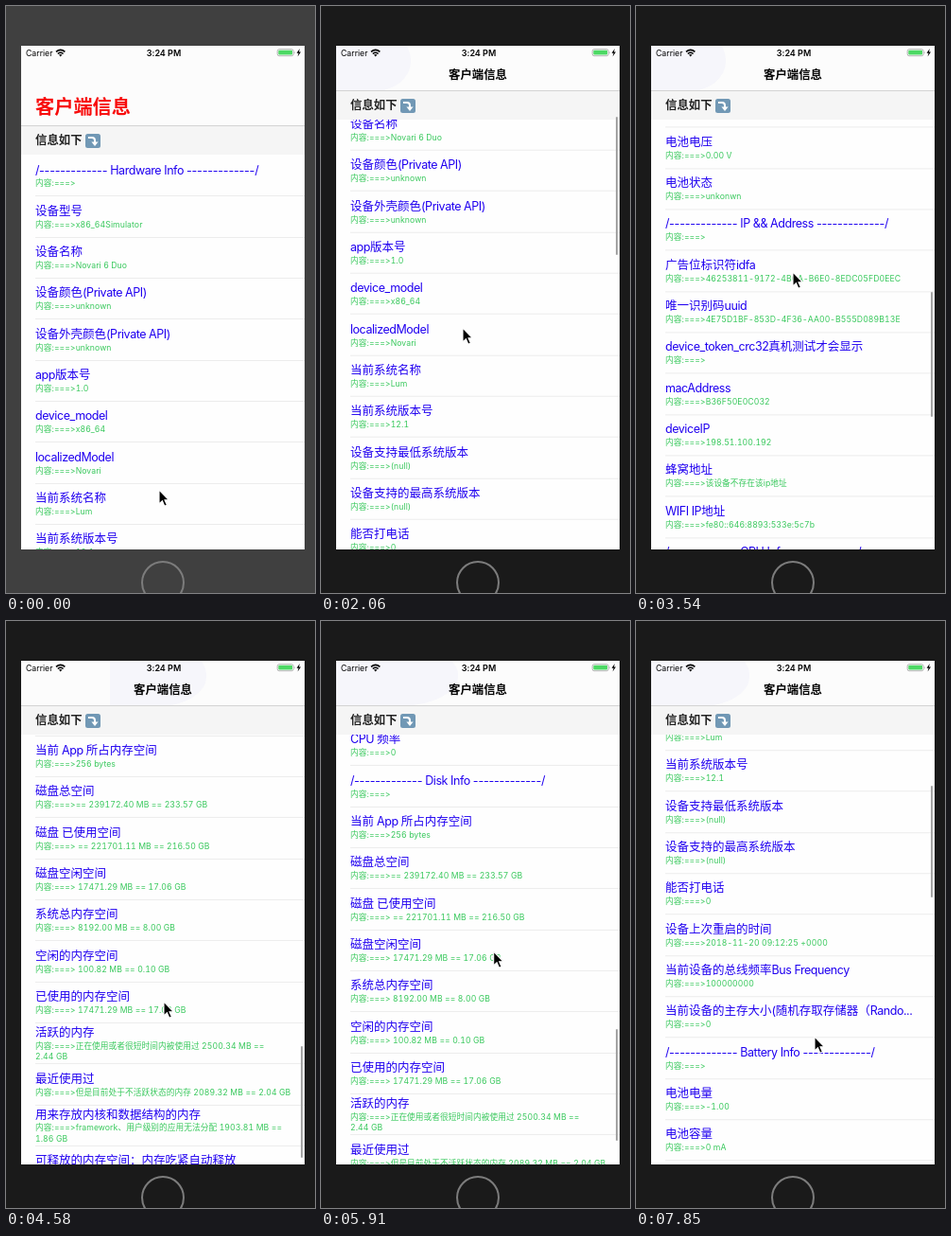
An HTML page that plays this animation: 327x620 px, repeating every 8 s.

```html
<!DOCTYPE html>
<html lang="zh-CN">
<head>
<meta charset="utf-8">
<style>
html, body { margin: 0; width: 100%; height: 100%; overflow: hidden; }
body { position: relative; background: #404040; font-family: Inter, "Noto Sans CJK SC", "Noto Sans CJK", sans-serif; font-variant-ligatures: none; font-feature-settings: "calt" 0; }
div, svg { position: absolute; white-space: nowrap; }
i { font-style: normal; letter-spacing: -.45px; }
b { font-weight: inherit; letter-spacing: -.2px; }
#home { left: 143px; top: 586px; width: 42px; height: 42px; border: 2px solid #7c7c7c; border-radius: 50%; }
#screen { left: 16px; top: 42px; width: 300px; height: 532px; background: #fefefe; overflow: hidden; }
#list { left: 0; top: 0; width: 100%; }
.row { left: 15px; right: 0; height: 42.33px; border-bottom: 1px solid #ececec; }
.name { top: 8.5px; font-size: 12.5px; line-height: 14px; color: #2000f0; }
.value { top: 24.2px; font-size: 8.67px; line-height: 11.5px; letter-spacing: .08px; font-variant-numeric: tabular-nums; color: #38c85c; }
.tall .name { top: 2.9px; }
.tall .value { top: 18.6px; }
#nav { left: 0; top: 0; width: 100%; background: #fcfcfc; overflow: hidden; }
#tint { top: -14px; height: 62px; border-radius: 0 45% 50% 0; background: #f6f6fb; }
#bigClip { left: 0; top: 46px; width: 100%; bottom: 0; overflow: hidden; }
#big { left: 15px; bottom: 5px; font-size: 20.2px; line-height: 28px; font-weight: 600; color: #f80c0c; }
#small { left: 0; top: 22.7px; width: 100%; text-align: center; font-size: 12.4px; line-height: 16px; font-weight: 600; color: #000; }
#head { left: 0; width: 100%; height: 31px; background: #f5f5f5; border-top: 1px solid #d3d3d3; box-sizing: border-box; }
#head div { left: 15px; top: 7.3px; font-size: 12.4px; line-height: 16px; font-weight: 600; color: #222; }
#head svg { left: 68px; top: 8px; }
#thumb { left: 296px; width: 2px; border-radius: 1px; background: #a4a4a4; }
#status { left: 1px; top: 0; }
#pointer { left: 0; top: 0; overflow: visible; }
</style>
</head>
<body>
<div id="home"></div>
<div id="screen">
  <div id="list"></div>
  <div id="nav">
    <div id="tint"></div>
    <div id="bigClip"><div id="big">客户端信息</div></div>
    <div id="small">客户端信息</div>
  </div>
  <div id="head">
    <div>信息如下</div>
    <svg width="16" height="15">
      <rect width="16" height="15" rx="2.5" fill="#7198b5"/>
      <path d="M3 4H7Q10 4 10 7V10" fill="none" stroke="#fff" stroke-width="2"/>
      <path d="M6.4 8.5H13.6L10 13Z" fill="#fff"/>
    </svg>
  </div>
  <div id="thumb"></div>
  <svg id="status" width="298" height="16" font-size="8.7">
    <text x="4" y="10.5">Carrier</text>
    <path d="M36 6.4Q40.7 2.2 45.4 6.4M37.8 8.5Q40.7 6 43.6 8.5" fill="none" stroke="#000" stroke-width="1.6"/>
    <path d="M39 9.6Q40.7 8.3 42.4 9.6L40.7 11.4Z"/>
    <text x="150" y="10.5" text-anchor="middle" font-size="9" font-weight="600">3:24 PM</text>
    <rect x="270.2" y="3.7" width="17" height="7" rx="2" fill="#fff" stroke="#a0a0a0" stroke-width=".8"/>
    <rect x="271.3" y="4.8" width="14.8" height="4.8" rx="1" fill="#4cd964"/>
    <path d="M288.4 6V8.6Q289.6 7.3 288.4 6Z" fill="#a0a0a0"/>
    <path d="M293.8 3L290.6 7.8H292.6L291.6 11.4L295 6.5H293Z"/>
  </svg>
</div>
<svg id="pointer" width="12" height="19">
  <path d="M0 0V14.8L3.4 11.7L5.8 17.2L8.3 16.1L6 10.8H10.4Z" fill="#000" stroke="#fff" stroke-width="1.1"/>
</svg>
<script>
const $ = id => document.getElementById(id);
const ROW = 43.333, TOP = 79, END = 1539, LOOP = 8000;

// One row per line: name|value; "#" marks a section title, "^" a line break.
const rows = `#Hardware Info
设备型号|x86_64Simulator
设备名称|Novari 6 Duo
设备颜色(Private API)|unknown
设备外壳颜色(Private API)|unknown
app版本号|1.0
device_model|x86_64
localizedModel|Novari
当前系统名称|Lum
当前系统版本号|12.1
设备支持最低系统版本|(null)
设备支持的最高系统版本|(null)
能否打电话|0
设备上次重启的时间|2018-11-20 09:12:25 +0000
当前设备的总线频率Bus Frequency|100000000
当前设备的主存大小(随机存取存储器（Rando...|0
#Battery Info
电池电量|-1.00
电池容量|0 mA
电池电压|0.00 V
电池状态|unkonwn
#IP && Address
广告位标识符idfa|46253811-9172-4BCA-B6E0-8EDC05FD0EEC
唯一识别码uuid|4E75D1BF-853D-4F36-AA00-B555D089B13E
device_token_crc32真机测试才会显示|
macAddress|B36F50E0C032
deviceIP|198.51.100.192
蜂窝地址|该设备不存在该ip地址
WIFI IP地址|fe80::646:8893:533e:5c7b
#CPU Info
CPU 处理器名称|x86_64
CPU 总数目|4
CPU 使用的总比例|0.25
CPU 频率|0
#Disk Info
当前 App 所占内存空间|256 bytes
磁盘总空间|== 239172.40 MB == 233.57 GB
磁盘 已使用空间| == 221701.11 MB == 216.50 GB
磁盘空闲空间| 17471.29 MB == 17.06 GB
系统总内存空间| 8192.00 MB == 8.00 GB
空闲的内存空间| 100.82 MB == 0.10 GB
已使用的内存空间| 17471.29 MB == 17.06 GB
活跃的内存|正在使用或者很短时间内被使用过 2500.34 MB ==^2.44 GB
最近使用过|但是目前处于不活跃状态的内存 2089.32 MB == 2.04 GB
用来存放内核和数据结构的内存|framework、用户级别的应用无法分配 1903.81 MB ==^1.86 GB
可释放的内存空间：内存吃紧自动释放|大对象存放所需的大块内存空间 75.31 MB == 0.07 GB`.split("\n");

const dashes = "-".repeat(13);
const escape = s => s.replace(/&/g, "&amp;").replace(/>/g, "&gt;");
$("list").innerHTML = rows.map((line, i) => {
  let [name, value = ""] = line.split("|");
  if (name[0] === "#") name = `/${dashes} ${name.slice(1)} ${dashes}/`;
  const latin = escape(name).replace(/[\x20-\x7e]+/g, "<i>$&</i>").replace(/-{2,}/g, "<b>$&</b>");
  const text = escape("内容:===>" + value).replace("^", "<br>");
  return `<div class="row${value.includes("^") ? " tall" : ""}" style="top:${i * ROW}px">
    <div class="name">${latin}</div><div class="value">${text}</div></div>`;
}).join("");

// Monotone cubic through [x, y] points.
function curve(points, x) {
  const last = points.length - 1;
  if (x <= points[0][0]) return points[0][1];
  if (x >= points[last][0]) return points[last][1];
  const slope = k => (points[k + 1][1] - points[k][1]) / (points[k + 1][0] - points[k][0]);
  const tangent = k => {
    if (k === 0) return slope(0);
    if (k === last) return slope(last - 1);
    const a = slope(k - 1), b = slope(k);
    return a * b > 0 ? 2 * a * b / (a + b) : 0;
  };
  const k = points.findIndex(p => p[0] > x) - 1;
  const [x0, y0] = points[k], [x1, y1] = points[k + 1];
  const w = x1 - x0, u = (x - x0) / w, v = 1 - u;
  return v * v * ((1 + 2 * u) * y0 + u * w * tangent(k)) +
         u * u * ((3 - 2 * u) * y1 - v * w * tangent(k + 1));
}

const scroll = [[1500, -37], [2060, 98], [3540, 815], [4580, 1516], [5320, 1554],
  [5650, 1539], [6660, 868], [7850, 374], [8000, 345]];
const pointerX = [[450, 162], [2060, 150], [3540, 166], [4580, 167], [5320, 180], [6660, 185], [7850, 189]];
const pointerY = [[450, 511], [1500, 475], [2060, 340], [2700, 410], [3540, 281],
  [4250, 400], [4580, 402], [5320, 337], [6660, 380], [7850, 439]];
const thumbDown = [[98, 117], [815, 302], [END, 455]];
const thumbUp = [[137, 117], [END, 455]];
// Faint colour behind the bar: start time, left, width.
const tints = [[0, 0, 0], [1700, 0, 79], [3840, 94, 102], [5500, 0, 129], [7200, 0, 104]];

function draw(now) {
  const t = now % LOOP, off = curve(scroll, t);
  const drop = Math.max(0, -off), over = Math.max(0, off - END);
  document.body.style.background = t < 1470 ? "#404040" : "#1a1a1a";
  $("list").style.transform = `translateY(${TOP - off}px)`;
  $("nav").style.height = 46.5 + drop + "px";
  $("head").style.top = 46.5 + drop + "px";
  $("big").style.opacity = Math.min(1, drop / 12);
  $("small").style.opacity = 1 - Math.min(1, drop / 12);

  const down = t < 4580;
  const top = curve(down ? thumbDown : thumbUp, off) + over * .72;
  const length = down ? Math.min(146, 146 - (off - 98) * .0198) : 118 - over * .72;
  const thumb = $("thumb").style;
  thumb.top = top - 42 + "px";
  thumb.height = length + "px";
  thumb.opacity = t < 1500 ? 0 : 1;

  const [, left, width] = tints.filter(p => p[0] <= t).pop();
  $("tint").style.left = left + "px";
  $("tint").style.width = width + "px";
  $("pointer").style.transform = `translate(${curve(pointerX, t)}px,${curve(pointerY, t)}px)`;
}

const start = performance.now();
function tick() {
  draw(performance.now() - start);
  requestAnimationFrame(tick);
}
tick();
</script>
</body>
</html>
```
